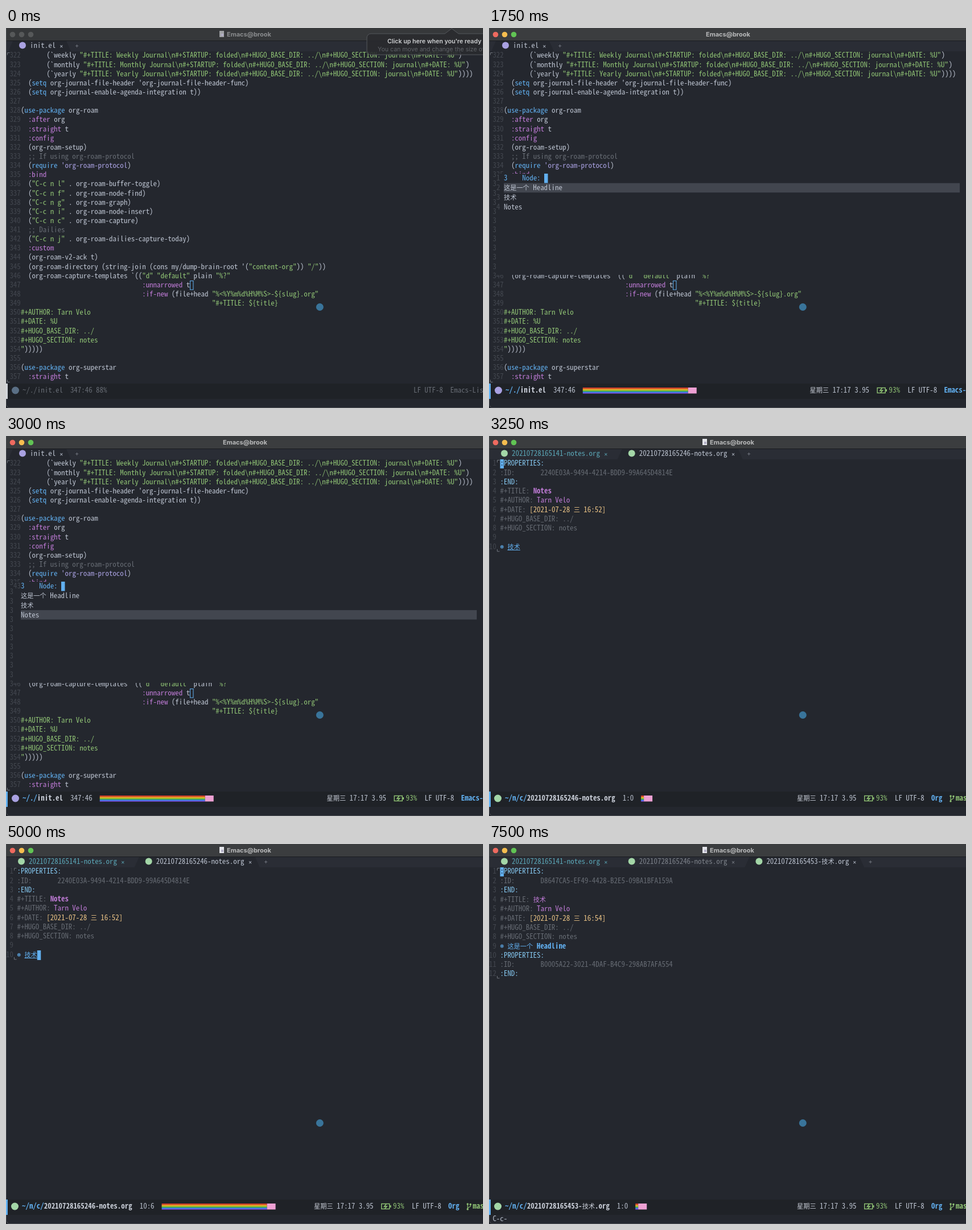
Recreate the animation shown at these times as an HTML page with a canvas. Size 838x668 px, loop 8 s.

```html
<!DOCTYPE html>
<html lang="en">
<head>
<meta charset="utf-8">
<title>Editor session</title>
<style>
  html, body { margin: 0; width: 100%; height: 100%; overflow: hidden; background: #111; }
  canvas { display: block; }
</style>
</head>
<body>
<canvas id="stage" width="838" height="668"></canvas>
<script type="text/plain" id="code">
       (`weekly "#+TITLE: Weekly Journal\n#+STARTUP: folded\n#+HUGO_BASE_DIR: ../\n#+HUGO_SECTION: journal\n#+DATE: %U")
       (`monthly "#+TITLE: Monthly Journal\n#+STARTUP: folded\n#+HUGO_BASE_DIR: ../\n#+HUGO_SECTION: journal\n#+DATE: %U")
       (`yearly "#+TITLE: Yearly Journal\n#+STARTUP: folded\n#+HUGO_BASE_DIR: ../\n#+HUGO_SECTION: journal\n#+DATE: %U"))))
  (setq org-journal-file-header 'org-journal-file-header-func)
  (setq org-journal-enable-agenda-integration t))

(use-package org-roam
  :after org
  :straight t
  :config
  (org-roam-setup)
  ;; If using org-roam-protocol
  (require 'org-roam-protocol)
  :bind
  ("C-c n l" . org-roam-buffer-toggle)
  ("C-c n f" . org-roam-node-find)
  ("C-c n g" . org-roam-graph)
  ("C-c n i" . org-roam-node-insert)
  ("C-c n c" . org-roam-capture)
  ;; Dailies
  ("C-c n j" . org-roam-dailies-capture-today)
  :custom
  (org-roam-v2-ack t)
  (org-roam-directory (string-join (cons my/dump-brain-root '("content-org")) "/"))
  (org-roam-capture-templates `(("d" "default" plain "%?"
                                 :unnarrowed t
                                 :if-new (file+head "%<%Y%m%d%H%M%S>-${slug}.org"
                                                    "#+TITLE: ${title}
#+AUTHOR: Tarn Velo
#+DATE: %U
#+HUGO_BASE_DIR: ../
#+HUGO_SECTION: notes
")))))

(use-package org-superstar
  :straight t
</script>
<script>
const ctx = document.getElementById('stage').getContext('2d');
const COL = 6.46, ROW = 16.14, CJK = 11.2;
const C = {
  bg: '#24272e', bar: '#1f2227', tabs: '#2a2d35', fg: '#bbc2cf', white: '#c9ced8', dim: '#666b73',
  faint: '#43474f', blue: '#61afef', pale: '#84c6ee', purple: '#a9a1e1', magenta: '#bf7bd6',
  green: '#8fc274', yellow: '#ecc486', teal: '#5aa5b5', leaf: '#a3d6a7', select: '#42464f', dot: '#39749a'
};
const MONO = '"Noto Sans Mono CJK SC", "Noto Sans Mono", monospace';
ctx.font = `100px ${MONO}`;
const SIZE = 100 * COL / ctx.measureText('0').width;

const code = document.getElementById('code').textContent.replace(/^\n/, '').trimEnd();
const tokens = code.match(/"[^"]*"|;;.*|\s:[a-z-]+|use-package|setq|require|'org-roam-protocol|[\s\S]/g);

function rect(x, y, w, h, color) {
  ctx.fillStyle = color;
  ctx.fillRect(x, y, w, h);
}

function disc(x, y, r, color) {
  ctx.fillStyle = color;
  ctx.beginPath();
  ctx.arc(x, y, r, 0, 7);
  ctx.fill();
}

function line(color, width, ...points) {
  ctx.strokeStyle = color;
  ctx.lineWidth = width;
  ctx.beginPath();
  for (const [x, y] of points) ctx.lineTo(x, y);
  ctx.stroke();
}

function label(x, y, text, color, font) {
  ctx.fillStyle = color;
  ctx.font = `${font} Inter, sans-serif`;
  ctx.fillText(text, x, y);
}

// Writes on the character grid around the row centre y and returns the end x.
function write(x, y, text, color, bold) {
  const weight = bold ? 'bold' : 'normal';
  ctx.fillStyle = color;
  for (const part of text.split(/([\u4e00-\u9fff]+|[‘’])/)) {
    const wide = part > '\u4e00', quote = /[‘’]/.test(part);
    ctx.font = wide ? `500 ${CJK}px "Noto Sans CJK SC", sans-serif`
      : quote ? `${weight} ${COL / 0.6}px "Liberation Mono", monospace`
      : `${weight} ${SIZE}px ${MONO}`;
    ctx.fillText(part, x, y + 4.4);
    x += part.length * (wide ? CJK : COL);
  }
  return x;
}

function tokenColor(token) {
  if (token[0] === '"') return C.green;
  if (token.startsWith(';;')) return C.dim;
  if (/^\s:./.test(token)) return C.magenta;
  if (token === "'org-roam-protocol") return C.purple;
  return token.length > 1 ? C.blue : C.fg;
}

function corner(x, y, bottom) {
  const end = bottom ? y - 4 : y + 4;
  line('#70757d', 1, [x + 4, y], [x, y], [x, end]);
}

function titleBar(active, icon) {
  rect(0, 0, 838, 22, active ? '#3b3d3f' : '#36383a');
  rect(0, 22, 838, 1, '#191b1f');
  const lights = active ? ['#ee6a5f', '#f5bd4f', '#61c454'] : Array(3).fill('#565859');
  lights.forEach((color, i) => disc(11.5 + i * 16, 11.5, 4.8, color));
  const text = active ? '#b9babb' : '#8a8c8e';
  if (icon) {
    rect(375, 5, 8, 11, active ? '#e4e5ea' : '#a0a2a5');
    rect(378, 10, 4, 4, '#b3b0c6');
  }
  label(icon ? 388 : 381, 15, 'Emacs@brook', text, 'bold 11px');
}

function tabBar(tabs, active, plusX) {
  rect(0, 23, 838, 18, C.tabs);
  tabs.forEach(({ x, name, close, color, mark }, i) => {
    if (i === active) {
      ctx.fillStyle = C.bg;
      ctx.beginPath();
      ctx.moveTo(x - 38, 41);
      ctx.lineTo(x - 30, 23);
      ctx.lineTo(close + 9, 23);
      ctx.lineTo(close + 17, 41);
      ctx.fill();
    }
    disc(x - 13, 30.5, 6, mark);
    write(x, 31, name, color);
    label(close - 3, 34.5, '×', color, '10px');
  });
  label(plusX - 4, 35, '+', '#777c85', '11px');
}

function rainbow(x, length) {
  ['#dc3a2c', '#f08a24', '#f2dc32', '#4fbf3c', '#3a8eea', '#6f4bd0']
    .forEach((color, i) => rect(x, 632 + i * 1.8, length, 1.8, color));
  rect(x + length, 632, 15, 10.5, '#eea0d3');
}

function battery(x) {
  ctx.strokeStyle = C.green;
  ctx.lineWidth = 1.4;
  ctx.strokeRect(x + .7, 632.5, 14, 9);
  rect(x + 15.5, 635, 2, 4, C.green);
  line(C.green, 1.6, [x + 9, 633], [x + 5.5, 637.5], [x + 10, 637], [x + 6.5, 641]);
}

function branch(x) {
  line(C.green, 1.2, [x + 2, 633], [x + 2, 642]);
  line(C.green, 1.2, [x + 2, 640], [x + 7, 637], [x + 7, 634]);
  for (const [dx, y] of [[2, 633], [2, 642], [7, 633.5]]) disc(x + dx, y, 1.7, C.green);
}

function modeLine({ x, dir, file, pos, bar, shift, mode, mark }) {
  rect(0, 625, 838, 27, C.bar);
  rect(0, 625, 3, 27, C.blue);
  disc(x - 12.5, 637, 6.5, mark);
  let end = write(x, 637, dir, C.blue, true);
  end = write(end, 637, file, C.white, true);
  end = write(end + 2 * COL, 637, pos, C.fg);
  rainbow(end + 13, bar);
  write(541 + shift, 637, '星期三', C.white);
  write(581 + shift, 637, '17:17 3.95', C.fg);
  battery(659 + shift);
  write(680 + shift, 637, '93%', C.green);
  write(713 + shift, 637, 'LF UTF-8', C.fg);
  write(777 + shift, 637, mode, C.blue, true);
  if (mode === 'Org') {
    branch(809);
    write(820, 637, 'master', C.green, true);
  }
}

function idleModeLine() {
  rect(0, 625, 838, 27, C.bar);
  rect(0, 625, 3, 27, '#d0d3d8');
  disc(16.5, 637, 6.5, '#5a6f85');
  write(29, 637, '~/./init.el  347:46 88%', C.dim);
  write(716, 637, 'LF UTF-8  Emacs-Lisp', C.dim);
}

function popup() {
  ctx.fillStyle = 'rgba(41,43,46,.88)';
  ctx.strokeStyle = '#55585c';
  ctx.lineWidth = 1;
  ctx.beginPath();
  ctx.moveTo(860, 10);
  ctx.lineTo(795, 10);
  ctx.lineTo(783, 1);
  ctx.lineTo(771, 10);
  ctx.arcTo(634, 10, 634, 20, 7);
  ctx.arcTo(634, 47, 645, 47, 7);
  ctx.lineTo(860, 47);
  ctx.fill();
  ctx.stroke();
  label(670, 27, "Click up here when you're ready", '#cfd1d3', '600 10.6px');
  label(653, 41, 'You can move and change the size of', '#5f6368', '10.6px');
}

function codeBuffer(solidCursor) {
  const top = 48;
  for (let i = 0; i < 36; i++) write(6.4, top + i * ROW, String(322 + i), C.faint);
  let row = 0, col = 0;
  for (const token of tokens) {
    const color = tokenColor(token);
    token.split('\n').forEach((text, i) => {
      if (i) { row++; col = 0; }
      write(26 + col * COL, top + row * ROW, text, color);
      col += text.length;
    });
  }
  corner(2.5, 43.5);
  corner(2.5, 622.5, true);
  if (solidCursor) rect(323, 444, COL, 16, C.blue);
  else {
    ctx.strokeStyle = C.blue;
    ctx.lineWidth = 1;
    ctx.strokeRect(323.5, 444.5, 5.5, 15.5);
  }
}

function nodePicker(selected) {
  rect(13, 256, 814, 178, C.bg);
  const rowY = i => 264 + i * 16.7;
  rect(26, rowY(selected) - 8, 801, 16.5, C.select);
  if (selected === 1) for (let i = 0; i < 4; i++) write(13, rowY(i), String(i + 1), C.faint);
  else write(13, rowY(0), '43', C.faint);
  write(26, 264, '3    Node:', C.blue);
  rect(97, 256, COL, 16.5, C.blue);
  ['这是一个 Headline', '技术', 'Notes'].forEach((name, i) => write(26, rowY(i + 1), name, C.fg));
}

const BULLET = '◉';
function orgBuffer(rows) {
  let extra = 0;
  rows.forEach((runs, i) => {
    if (runs.some(([text]) => /[\u4e00-\u9fff]/.test(text))) extra += .8;
    const y = 48 + i * ROW + extra;
    write((i < 9 ? 1 : 0) * COL, y, String(i + 1), C.faint);
    let x = 19.5;
    for (const [text, color, bold] of runs) {
      if (text === BULLET) {
        ctx.strokeStyle = color;
        ctx.lineWidth = 1;
        ctx.beginPath();
        ctx.arc(x + 3.3, y, 2.5, 0, 7);
        ctx.stroke();
        disc(x + 3.3, y, 1.3, color);
        x += 2 * COL;
      } else x = write(x, y, text, color, bold);
    }
    if (i === rows.length - 1) corner(14.5, y + 8, true);
  });
  corner(14.5, 42.5);
}

const drawer = id => [
  [[':PROPERTIES:', C.pale]], [[':ID:       ' + id, C.dim]], [[':END:', C.pale]]
];
const header = (id, title, time) => [
  ...drawer(id),
  [['#+TITLE: ', C.dim], [title, C.magenta, true]],
  [['#+AUTHOR: ', C.dim], ['Tarn Velo', C.magenta]],
  [['#+DATE: ', C.dim], [`[2021-07-28 三 ${time}]`, C.yellow]],
  [['#+HUGO_BASE_DIR: ../', C.dim]],
  [['#+HUGO_SECTION: notes', C.dim]]
];
const notes = [
  ...header('2240E03A-9494-4214-BDD9-99A645D4814E', 'Notes', '16:52'),
  [], [[BULLET, C.blue], ['技术', C.blue, true]]
];
const tech = [
  ...header('D8647CA5-EF49-4428-B2E5-09BA1BFA159A', '技术', '16:54'),
  [[BULLET, C.blue], ['这是一个 Headline', C.blue, true]],
  ...drawer('B0005A22-3021-4DAF-B4C9-298AB7AFA554')
];

function firstCharCursor() {
  rect(19.5, 41, COL, 16, C.blue);
  write(19.5, 48, ':', C.bg);
}

function codeScene(t) {
  const active = t >= 750, picking = t >= 1750;
  titleBar(active, !picking);
  tabBar([{ x: 42, name: 'init.el', close: 97, color: C.fg, mark: C.purple }], 0, 125);
  codeBuffer(active && !picking);
  if (picking) nodePicker(t < 2500 ? 1 : t < 3000 ? 2 : 3);
  if (active) modeLine({ x: 29, dir: '~/./', file: 'init.el', pos: '347:46', bar: 185, shift: 22.5, mode: 'Emacs-Lisp', mark: C.purple });
  else idleModeLine();
  if (t < 250) popup();
}

function notesCursor(t) {
  if (t < 4500) return firstCharCursor();
  if (t >= 4750 && t < 5000) return rect(19.5, 187, COL, 17, C.blue);
  if (t < 5250) return rect(54.8, 187, COL, 17, C.blue);
  rect(43.6, 187, CJK, 17, C.blue);
  write(43.6, 195, '术', C.bg);
}

function orgScene(t) {
  const inTech = t >= 5750;
  const tab = (i, name, color) => ({ x: 40 + i * 223.7, name, close: 205 + i * 223.7 - (i > 1 ? 10.4 : 0), color, mark: C.leaf });
  const tabs = [
    tab(0, '20210728165141-notes.org', C.teal),
    tab(1, '20210728165246-notes.org', inTech ? '#7c8189' : C.fg)
  ];
  if (inTech) tabs.push(tab(2, '20210728165453-技术.org', C.fg));
  titleBar(true, true);
  tabBar(tabs, tabs.length - 1, inTech ? 670.5 : 457);
  orgBuffer(inTech ? tech : notes);

  let pos = '1:0', bar = 5;
  if (inTech) firstCharCursor();
  else {
    line(C.blue, 1, [32.5, 200.5], [54.8, 200.5]);
    notesCursor(t);
    if (t >= 4500) {
      pos = t < 4750 ? '10:46' : t < 5000 ? '10:0' : t < 5250 ? '10:6' : '10:5';
      bar = pos === '10:0' ? 170 : 185;
    }
  }
  modeLine({ x: 28, dir: '~/n/c/', file: tabs[tabs.length - 1].name, pos, bar, shift: 0, mode: 'Org', mark: C.leaf });

  const echo = [
    [4250, 'C-c-'], [4500, 'Mark set'], [4750, ''], [5500, 'C-c C-o'],
    [5750, 'Position saved to mark ring, go back with ‘C-c &’.'], [7000, ''], [7250, 'C-c-']
  ].filter(([start]) => t >= start).pop();
  if (echo) write(6.4, 659, echo[1], C.fg);
}

function pointer(t) {
  if (t >= 750 && t < 1000) disc(660.5, 634.5, 6.5, C.dot);
  else if (t >= 1000 && t < 1500) disc(548, 507, t < 1250 ? 8 : 7, C.dot);
  else disc(551.3, 490.5, 6.5, C.dot);
}

function draw(now) {
  const t = now % 8000;
  rect(0, 0, 838, 668, C.bg);
  (t < 3250 ? codeScene : orgScene)(t);
  pointer(t);
  line('#4a4d52', 1, [.5, 0], [.5, 625]);
  line('#4a4d52', 1, [.5, 652], [.5, 663], [4, 667.5], [838, 667.5]);
  requestAnimationFrame(draw);
}
requestAnimationFrame(draw);
</script>
</body>
</html>
```
